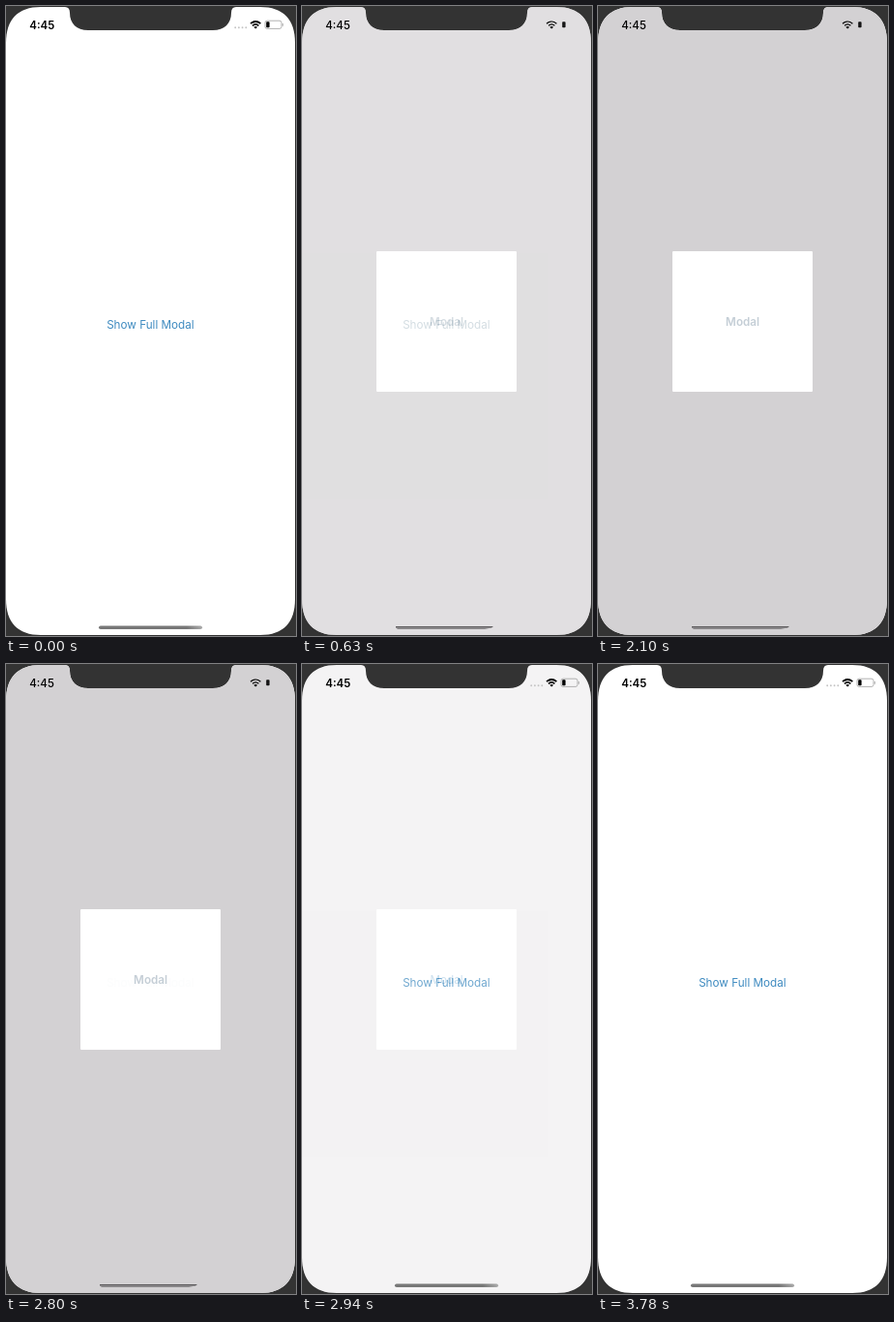
An HTML page that plays this animation: 300 by 650 pixels, repeating every 3.85 s.

```html
<!DOCTYPE html>
<html lang="en">
<head>
<meta charset="utf-8">
<title>Modal fade</title>
<style>
  html, body { margin: 0; width: 100%; height: 100%; overflow: hidden; background: #333; }
  svg { display: block; width: 300px; height: 650px; }
  text { font-family: Inter, Roboto, sans-serif; }
  .label { font-size: 11.7px; text-anchor: middle; }
</style>
</head>
<body>
<svg viewBox="0 0 300 650">
  <defs>
    <clipPath id="screen">
      <path d="M0 38C0 14 12 1 36 1H61Q66 1 66 7C66 18 73 25 85 25H214C226 25 233 18 233 7Q233 1 238 1H263C287 1 299 14 299 38V612C299 636 287 649 263 649H36C12 649 0 636 0 612Z"/>
    </clipPath>
    <linearGradient id="bar">
      <stop offset="0" stop-color="#777"/>
      <stop offset=".85" stop-color="#777"/>
      <stop offset="1" stop-color="#aaa"/>
    </linearGradient>
  </defs>
  <rect width="300" height="650" fill="#333"/>
  <g clip-path="url(#screen)">
    <rect width="300" height="650" fill="#fff"/>
    <text id="button" class="label" x="149.4" y="333">Show Full Modal</text>
    <g id="overlay">
      <rect width="300" height="650" fill="#d3d1d3"/>
      <rect x="77" y="253" width="145" height="145" rx="1" fill="#fff"/>
      <text id="modal" class="label" x="149.6" y="329.5">Modal</text>
    </g>

    <text id="clock" x="24.3" y="23.7" font-size="11.5">4:45</text>
    <g id="wifi" fill="none" stroke="#000" stroke-width="1.7">
      <path d="M253 18.2Q258.2 13.8 263.4 18.2M255 20.3Q258.2 17.6 261.4 20.3"/>
      <path d="M258.2 23.6L256.3 21.8Q258.2 20.3 260.1 21.8Z" fill="#000" stroke="none"/>
    </g>
    <rect id="charge" x="269.2" y="16.3" width="3.4" height="6" rx=".8"/>
    <g id="details">
      <path d="M237.2 22.3H249" stroke="#c4c4c4" stroke-width="1.9" stroke-linecap="round" stroke-dasharray="0 3.7"/>
      <rect x="268" y="15.2" width="17" height="8.2" rx="2" fill="none" stroke="#aaa" stroke-width=".9"/>
      <path d="M286.3 18v2.8" stroke="#aaa" stroke-width="1"/>
      <rect x="96" y="639.5" width="107" height="3.6" rx="1.8" fill="url(#bar)"/>
    </g>
    <g id="plainBar">
      <path d="M97 640H198L196 641.4H97Z" fill="#5c5a5c"/>
      <path d="M97 641.4H196L189 643H99Z" fill="#858385"/>
    </g>
  </g>
</svg>
<script>
const LOOP = 3850, STEP = 70;
const $ = id => document.getElementById(id);
const set = (id, attrs) => {
  for (const name in attrs) $(id).setAttribute(name, attrs[name]);
};
const ease = (time, start, length) => {
  const u = Math.min(1, Math.max(0, (time - start) / length));
  return u * u * (3 - 2 * u);
};

function draw(now) {
  const time = Math.floor((now % LOOP) / STEP) * STEP;
  const shown = ease(time, 480, 240) - ease(time, 2780, 240);
  const muted = time >= 560 && time < 2870;
  const pressed = time === 490;

  set('overlay', { opacity: shown });
  set('button', { fill: muted ? '#7896a6' : '#3f8bc0', opacity: pressed ? 0.4 : 1 });
  set('modal', { fill: muted ? '#c4ced6' : '#3f8bc0', 'font-weight': muted ? 600 : 400 });
  set('clock', { 'font-weight': muted ? 500 : 600 });
  set('wifi', { 'stroke-width': muted ? 1.2 : 1.7 });
  set('charge', { opacity: muted ? 0.9 : 1 });
  set('details', { opacity: muted ? 0 : 1 });
  set('plainBar', { opacity: muted ? 1 : 0 });
}

const start = performance.now();
function tick() {
  draw(performance.now() - start);
  requestAnimationFrame(tick);
}
tick();
</script>
</body>
</html>
```
